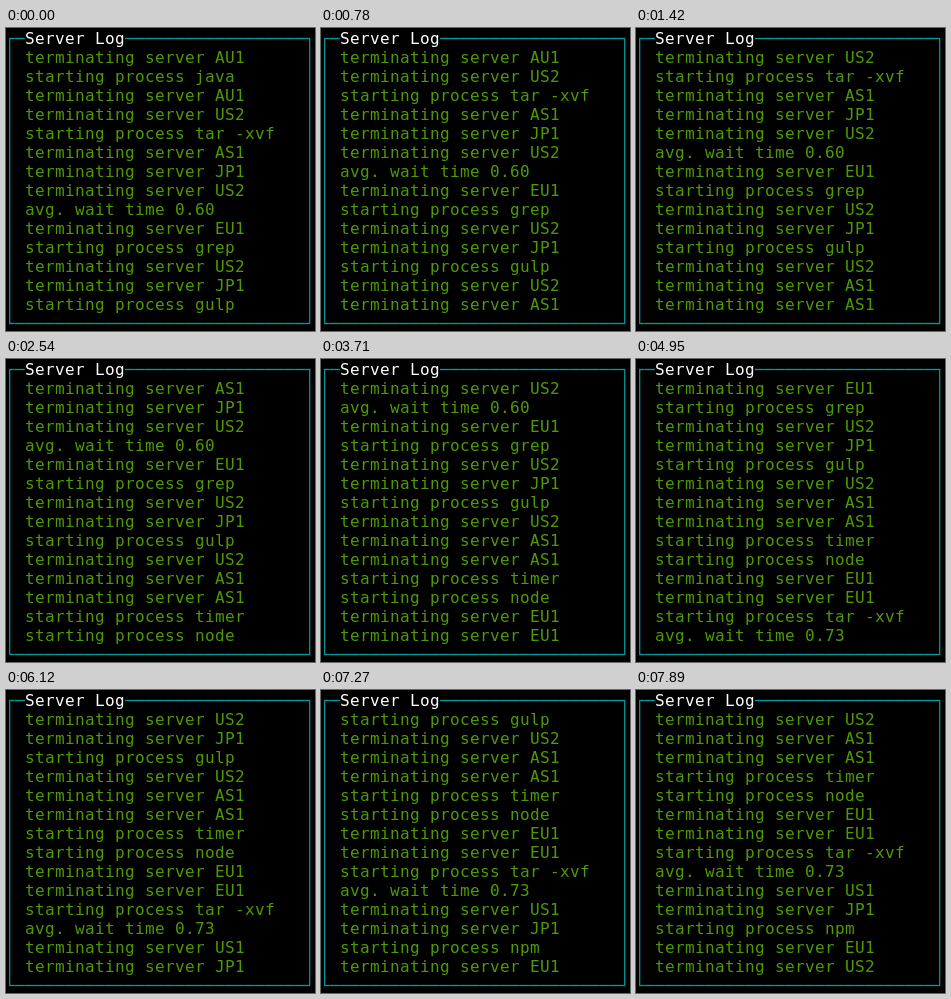
Animation of 309 by 303 pixels, one loop 8 s. Source, as an HTML page:

```html
<!DOCTYPE html>
<html lang="en">
<head>
<meta charset="utf-8">
<title>Server Log</title>
<style>
  html, body { margin: 0; width: 100%; height: 100%; overflow: hidden; background: #000; }
  pre {
    position: absolute; left: -1px; top: 1px; margin: 0;
    font: 16px/19px "DejaVu Sans Mono", monospace;
    letter-spacing: calc(10px - 1ch); /* 10px terminal cells */
    color: #06989a;
  }
  b { font-weight: normal; color: #fff; }
  #log { left: 19px; top: 20px; color: #4e9a06; }
</style>
</head>
<body>
<pre id="box"></pre>
<pre id="log"></pre>
<script>
const ROWS = 14, LOOP = 8000;
const steps = [190, 780, 1420, 1980, 2540, 3160, 3710, 4330, 4950, 5500, 6120, 6680, 7270, 7890];
const entries = `AU1 java AU1 US2 tar AS1 JP1 US2 0.60 EU1 grep US2 JP1 gulp
  US2 AS1 AS1 timer node EU1 EU1 tar 0.73 US1 JP1 npm EU1 US2`.split(/\s+/);

function line(entry) {
  if (/^[A-Z]/.test(entry)) return 'terminating server ' + entry;
  if (/^\d/.test(entry)) return 'avg. wait time ' + entry;
  return 'starting process ' + (entry === 'tar' ? 'tar -xvf' : entry);
}

const lines = entries.map(line);
const box = document.getElementById('box');
const log = document.getElementById('log');
const side = '│' + ' '.repeat(29) + '│\n';
box.innerHTML = '┌─<b>Server Log</b>' + '─'.repeat(18) + '┐\n' +
  side.repeat(ROWS) + '└' + '─'.repeat(29) + '┘';

let shown = -1;
function draw(now) {
  const t = now % LOOP;
  const first = steps.filter(s => s <= t).length;
  if (first !== shown) {
    log.textContent = lines.slice(first, first + ROWS).join('\n');
    shown = first;
  }
  requestAnimationFrame(draw);
}
draw(performance.now());
</script>
</body>
</html>
```
